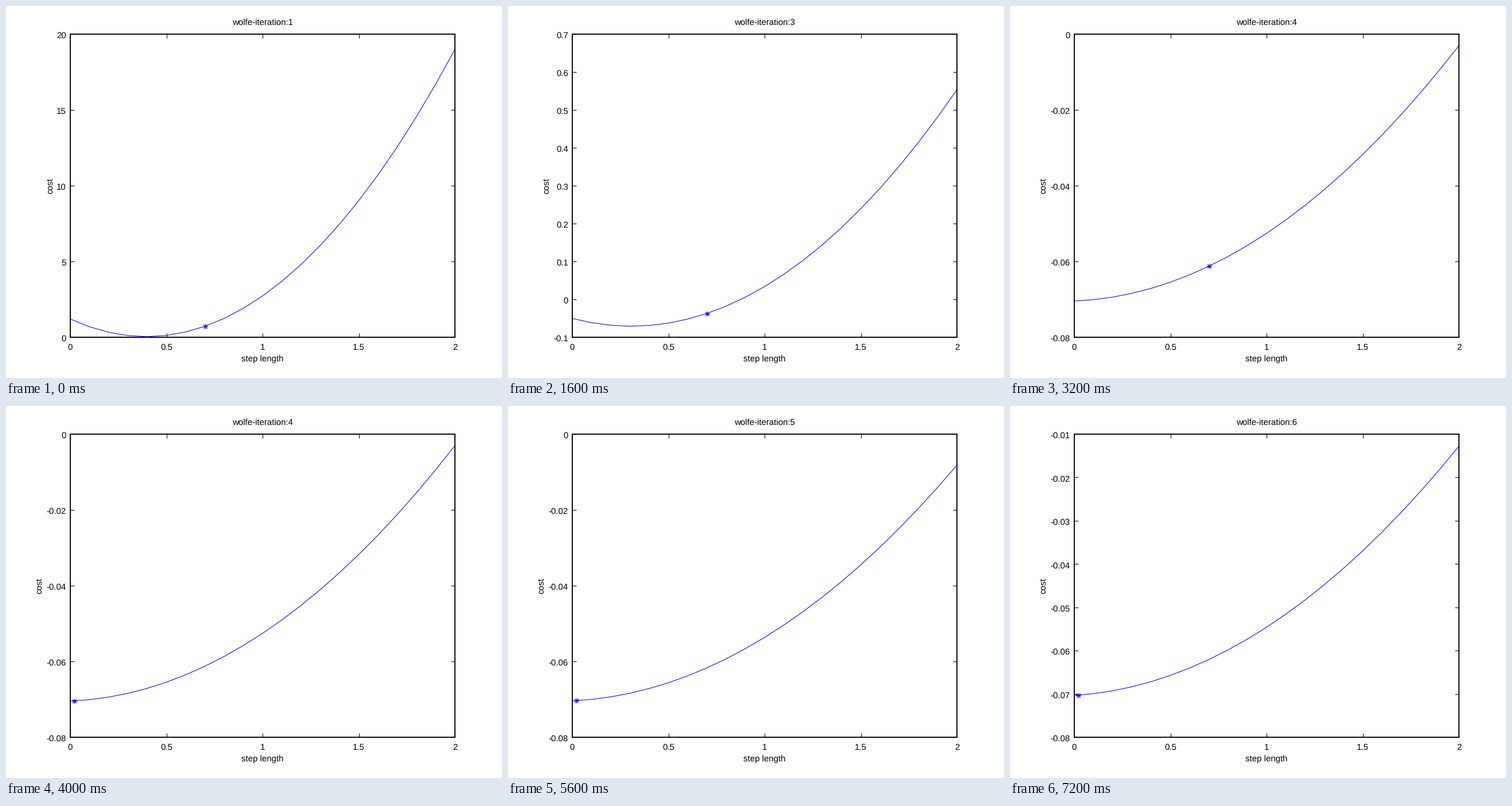
A matplotlib script for the animation above (8 s loop, 864 px wide and 648 px high).

```python
import numpy as np
import matplotlib.pyplot as plt
from matplotlib.animation import FuncAnimation

W, H, DPI = 864, 648, 108
LEFT, RIGHT, TOP, BOTTOM = 112, 782, 49, 577
MID_X, MID_Y = (LEFT + RIGHT) / 2, (TOP + BOTTOM) / 2
FONT_PX = 15

plt.rcParams["font.family"] = "Liberation Sans"
plt.rcParams["font.size"] = FONT_PX * 72 / DPI
plt.rcParams["text.hinting"] = "none"
plt.rcParams["text.hinting_factor"] = 1

START_COST, FIRST_STEP, MAX_HALVINGS = 1.2, 0.7, 5

# Slope and curvature of the cost along each search direction;
# the late directions change only gradually.
DIRECTIONS = [(-5.84, 7.368), (-2.562, 2.083), (-0.1334, 0.2176)]
DIRECTIONS += [(0.00205 + 0.00034 * k, 0.01583 * 0.907 ** k) for k in range(3)]

# Upper limit and tick spacing of the cost axis
SCALES = [(20, 5), (4, 1), (0.7, 0.1), (0, 0.02), (0, 0.02), (-0.01, 0.01)]

grid = np.linspace(0, 2, 21)


def line_search(poly):
    """Halve the step until the cost drops or the halvings run out."""
    step = FIRST_STEP
    for _ in range(MAX_HALVINGS):
        if np.polyval(poly, step) <= poly[-1]:
            break
        step /= 2
    return step


def build_scenes():
    """One scene for each first step, one more if the search shortens it."""
    scenes, cost = [], START_COST
    for i, (slope, curvature) in enumerate(DIRECTIONS):
        poly = (curvature, slope, cost)
        accepted = line_search(poly)
        scenes.append((i, poly, FIRST_STEP))
        if accepted < FIRST_STEP:
            scenes.append((i, poly, accepted))
        cost = np.polyval(poly, accepted)
    return scenes


def text_width(s):
    return FONT_PX * sum({"-": 0.333, ".": 0.278}.get(c, 0.556) for c in s)


fig = plt.figure(figsize=(W / DPI, H / DPI), dpi=DPI, facecolor="white")
ax = fig.add_axes([LEFT / W, 1 - BOTTOM / H, (RIGHT - LEFT) / W, (BOTTOM - TOP) / H])


def label(x, y, s="", ha="center", **kw):
    """Text with its baseline at pixel (x, y), measured from the top left."""
    return fig.text(x / W, 1 - y / H, s, ha=ha, va="baseline", color="black", **kw)


ax.set_xlim(0, 2)
ax.set_xticks(np.arange(0, 2.1, 0.5))
ax.tick_params(direction="in", length=4.5, width=0.7, top=True, right=True,
               labelleft=False, labelbottom=False)
for spine in ax.spines.values():
    spine.set_linewidth(1.25)

for t in ax.get_xticks():
    label(LEFT + (RIGHT - LEFT) * t / 2, 599, f"{t:g}")
label(MID_X, 619, "step length")
title = label(MID_X, 34)
ylabel = label(LEFT, MID_Y, "cost", rotation=90, rotation_mode="anchor")
ytexts = [label(105, BOTTOM, ha="right") for _ in range(9)]

curve, = ax.plot([], [], color="blue", lw=0.7)
star, = ax.plot([], [], color="blue", marker=(8, 2, 0), ms=6, mew=0.6,
                ls="none", clip_on=False, snap=False)

scenes = build_scenes()


def update(n):
    i, poly, step = scenes[n]
    costs = np.polyval(poly, grid)
    high, gap = SCALES[i]
    low = gap * np.floor(costs.min() / gap)
    ticks = np.linspace(low, high, round((high - low) / gap) + 1)
    ax.set_ylim(low, high)
    ax.set_yticks(ticks)

    names = [f"{round(t, 4) + 0.0:g}" for t in ticks]
    for text in ytexts:
        text.set_text("")
    for k, (text, name) in enumerate(zip(ytexts, names)):
        y = BOTTOM - (BOTTOM - TOP) * k / (len(ticks) - 1)
        text.set_y(1 - (y + 7.2) / H)
        text.set_text(name)
    # The axis label keeps clear of the widest tick label
    ylabel.set_x((99 - 1.08 * max(map(text_width, names))) / W)

    title.set_text(f"wolfe-iteration:{i + 1}")
    curve.set_data(grid, costs)
    star.set_data([step], [np.polyval(poly, step)])
    return [curve, star, title, ylabel, *ytexts]


anim = FuncAnimation(fig, update, frames=len(scenes), interval=800,
                     init_func=lambda: update(0), repeat=True, repeat_delay=0,
                     blit=False)
plt.show()
```
